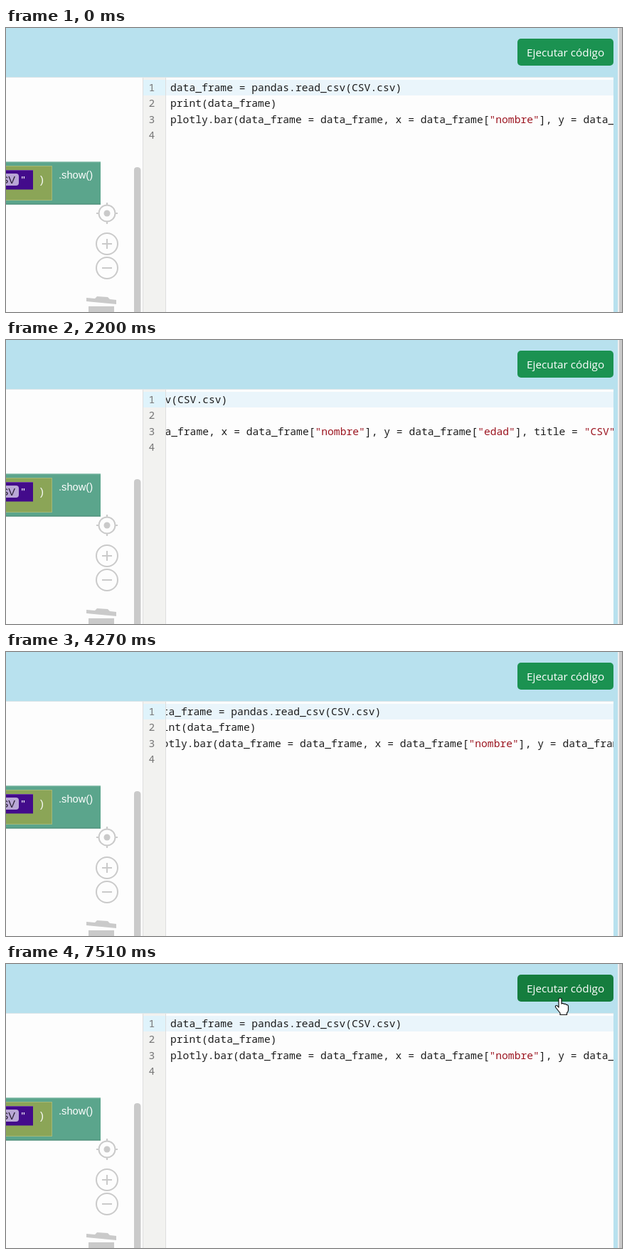
Recreate the animation shown at these times as an HTML page. Size 866x400 px, loop 7.55 s.

```html
<!DOCTYPE html>
<html lang="es">
<head>
<meta charset="utf-8">
<title>Editor</title>
<style>
  html, body { margin: 0; width: 100%; height: 100%; overflow: hidden; background: #fdfdfd; }
  svg { display: block; width: 866px; height: 400px; }
  text { white-space: pre; }
  .code { font: 14.66px "Noto Sans Mono", "Liberation Mono", monospace; fill: #1c1c1c; }
  .num { fill: #777; text-anchor: middle; }
  .str { fill: #9c1520; }
  .block { font: 14.67px "Liberation Sans", Arial, sans-serif; fill: #fff; }
  .label { font: 15.3px "Open Sans", "Noto Sans", sans-serif; fill: #fff; }
  .ctl { fill: none; stroke: #cacaca; stroke-width: 2; }
  .solid { fill: #cacaca; }
  .pointer { fill: #fff; stroke: #111; stroke-width: 1.2; stroke-linejoin: round; }
</style>
</head>
<body>
<svg viewBox="0 0 866 400">
  <defs><clipPath id="view"><rect x="225" y="70" width="629" height="330"/></clipPath></defs>
  <rect width="866" height="400" fill="#fdfdfd"/>

  <!-- block workspace -->
  <rect x="-5" y="188.500" width="138" height="60" fill="#5ba58c"/>
  <path d="M0 189H133" stroke="#7db8a4"/>
  <path d="M0 248H133" stroke="#498470"/>
  <rect x="-5" y="194.500" width="69.500" height="48" fill="#8ba557" stroke="#a3b97a"/>
  <rect x="-5" y="200" width="43" height="27.500" fill="#430b8b"/>
  <path d="M0 200.500H38" stroke="#6a3ca3"/>
  <rect x="-25" y="205" width="43" height="17" rx="4" fill="#b9a7d6"/>
  <g class="block">
    <text x="13" y="219" text-anchor="end" style="fill:#2a2036">CSV</text>
    <text x="21.500" y="219">"</text>
    <text x="48" y="219">)</text>
    <text x="74" y="212">.show()</text>
  </g>
  <g class="ctl">
    <circle cx="142" cy="261" r="11.500"/>
    <path d="M142 246v4M142 272v4M127 261h4M153 261h4"/>
    <circle cx="142" cy="304" r="15"/>
    <path d="M135 304h14M142 297v14"/>
    <circle cx="142" cy="338" r="15"/>
    <path d="M135 338h14"/>
  </g>
  <g class="solid">
    <circle cx="142" cy="261" r="4.500"/>
    <path d="M113 380L125 381L128 378L143 379L146 382L155 383V389L113 385Z"/>
    <rect x="116" y="392" width="36" height="10"/>
    <path d="M180 400V200Q180 196 184.500 196T189.500 200V400Z"/>
  </g>

  <!-- code editor -->
  <rect x="225" y="73" width="629" height="22" fill="#eaf5fb"/>
  <rect x="192" y="69" width="33" height="331" fill="#f2f2f0"/>
  <rect x="193" y="73" width="31" height="22" fill="#dff3fb"/>
  <path d="M192.500 69V400M224.500 69V400" stroke="#dedede"/>
  <g id="nums" class="code num"></g>
  <g clip-path="url(#view)"><g id="lines" class="code"></g></g>

  <!-- header and page edge -->
  <rect width="866" height="69" fill="#b8e1ee"/>
  <path d="M0 69.500H854" stroke="#dde6e9"/>
  <rect x="854" y="69" width="6" height="331" fill="#b8e1ee"/>
  <rect x="860" width="2" height="400" fill="#eee"/>
  <rect x="862" width="4" height="400" fill="#c9c9c9"/>
  <rect id="button" x="719" y="15" width="135" height="38" rx="5"/>
  <text class="label" x="732" y="40">Ejecutar código</text>

  <path id="arrow" class="pointer" d="M0 0V16L3.700 12.500L6.300 18.500L8.800 17.400L6.200 11.500H11.300Z"/>
  <path id="hand" class="pointer" d="M-2 1.500Q-2 0 0 0T2 1.500V8Q4 6.500 5.500 8.500Q7.500 7.500 8.800 9.500Q11.500 9 11.500 12V17Q11.500 19 9.500 21V23.500H0V21L-6 13.500Q-7.500 11 -5.500 10.500Q-4.500 10 -2 13Z"/>
</svg>
<script>
const LOOP = 7550;
const CODE = [
  'data_frame = pandas.read_csv(CSV.csv)',
  'print(data_frame)',
  'plotly.bar(data_frame = data_frame, x = data_frame["nombre"], y = data_frame["edad"], title = "CSV").show()',
  ''
];

// [time, value...]
const SCROLL = [[780, 0], [920, 16], [1130, 54], [2200, 245], [2450, 293], [2650, 320],
  [3150, 320], [3300, 297], [3840, 139], [4250, 32], [4450, 0]];
const PATH = [[2720, 457, 404], [2940, 457, 395], [3120, 457, 404], [5430, 330, 404],
  [5600, 385, 350], [5950, 690, 135], [6160, 779, 51], [6300, 779, 48]];
const NORMAL = [27, 146, 81], HOVER = [21, 125, 62];

const $ = id => document.getElementById(id);
const clamp = v => Math.max(0, Math.min(1, v));

function sample(keys, t) {
  if (t <= keys[0][0]) return keys[0].slice(1);
  const i = keys.findIndex(k => k[0] > t);
  if (i < 0) return keys[keys.length - 1].slice(1);
  const a = keys[i - 1], b = keys[i];
  const p = (t - a[0]) / (b[0] - a[0]);
  return a.slice(1).map((v, n) => v + (b[n + 1] - v) * p);
}

function add(parent, tag, content, attrs = {}) {
  const el = document.createElementNS('http://www.w3.org/2000/svg', tag);
  for (const key in attrs) el.setAttribute(key, attrs[key]);
  el.textContent = content;
  return parent.appendChild(el);
}

CODE.forEach((line, i) => {
  const y = 89 + i * 22.4;
  add($('nums'), 'text', i + 1, { x: 205, y });
  const row = add($('lines'), 'text', '', { x: 231, y });
  line.split(/("[^"]*")/).forEach(part =>
    add(row, 'tspan', part, part[0] === '"' ? { class: 'str' } : {}));
});

function draw(t) {
  const scroll = Math.round(sample(SCROLL, t)[0]);
  $('lines').setAttribute('transform', `translate(${-scroll} 0)`);

  const [x, y] = sample(PATH, t).map(Math.round);
  const over = t >= 6160;
  for (const id of ['arrow', 'hand']) {
    $(id).setAttribute('transform', `translate(${x} ${y})`);
    $(id).style.display = (id === 'hand') === over ? '' : 'none';
  }
  const mix = clamp((t - 6160) / 150);
  $('button').setAttribute('fill',
    `rgb(${NORMAL.map((c, i) => Math.round(c + (HOVER[i] - c) * mix))})`);
}

const start = performance.now();
function tick() {
  draw((performance.now() - start) % LOOP);
  requestAnimationFrame(tick);
}
tick();
</script>
</body>
</html>
```
